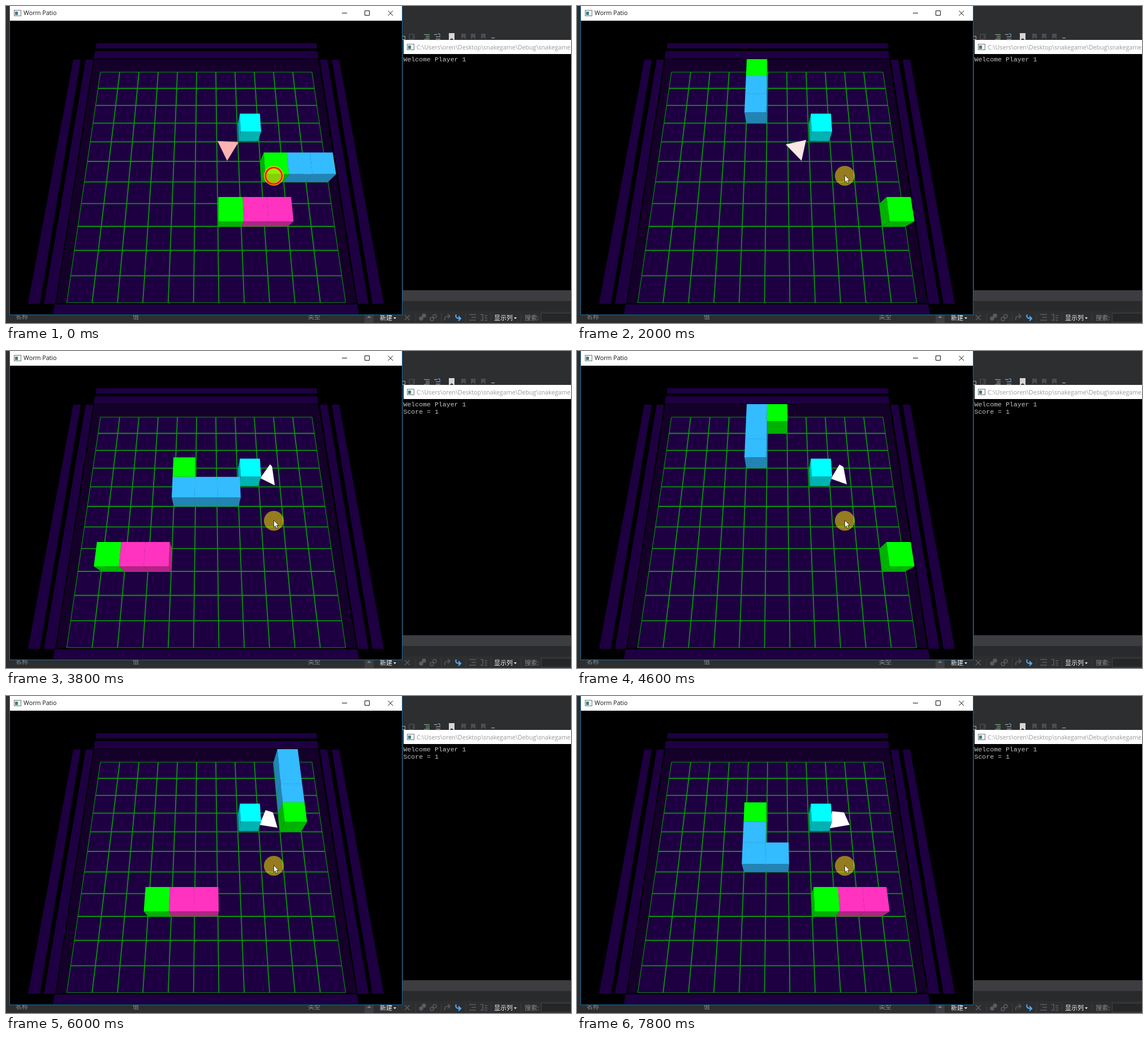
Recreate the animation shown at these times as an HTML page. Size 999x561 px, loop 8000 ms.

```html
<!DOCTYPE html>
<html lang="en">
<head>
<meta charset="utf-8">
<title>Worm Patio</title>
<style>
  html, body { margin: 0; width: 100%; height: 100%; overflow: hidden; background: #2d2e30; }
  svg { display: block; width: 100%; height: 100%; }
  .ui { font: 10.7px "Open Sans", "Noto Sans", sans-serif; }
  .cjk { font: 11px "Noto Sans CJK SC", "Noto Sans CJK", sans-serif; }
  .term { font: 11.55px "Liberation Mono", "Noto Sans Mono", monospace; fill: #c4c4c4; }
</style>
</head>
<body>
<svg viewBox="0 0 999 561" preserveAspectRatio="none">
  <rect width="999" height="561" fill="#2d2e30"/>

  <!-- editor toolbars -->
  <g fill="none" stroke="#55565a">
    <path d="M701 53.5h4.500v6h-4.500" stroke="#aaa"/>
    <path d="M713 50h7v9h-7zM722 49v10"/>
    <path d="M739 50.500h10M742 53.500h7M742 56.500h7M739 59h10" stroke="#8fb98f"/>
    <path d="M757 50.500h6M760 54.500h8M760 58.500h8" stroke="#b8b8b8"/>
    <path d="M764 49q4 0 3 4" stroke="#4a9be0" stroke-width="1.500"/>
    <path d="M783 48h10v13l-5-4-5 4z" fill="#d6d6d6" stroke="none"/>
    <path d="M805 49v10l4-4 4 4v-10zM822 49v10l4-4 4 4v-10zM840 49v10l4-4 4 4v-10z" fill="#4c4d50" stroke="none"/>
    <path d="M858 56.500h6" stroke="#bbb"/>
  </g>
  <rect x="701" y="503" width="298" height="19" fill="#3d3d41"/>
  <rect x="701" y="522" width="298" height="18" fill="#292a2c"/>
  <rect x="634" y="545" width="16" height="16" fill="#3e3e42"/>
  <path d="M638 552l4-4 4 4z" fill="#77787c"/>
  <g class="cjk" fill="#8b8b8d">
    <text x="17" y="554">名称</text>
    <text x="224" y="554">值</text>
    <text x="534" y="554">类型</text>
    <text x="917" y="556">搜索:</text>
    <g fill="#f1f1f1">
      <text x="661" y="556">新建</text>
      <text x="863" y="556">显示列</text>
      <path d="M685 551h5l-2.500 3zM898 551h5l-2.500 3z"/>
    </g>
  </g>
  <g fill="none" stroke="#5b5c60" stroke-width="1.500">
    <path d="M705 547l9 9M714 547l-9 9"/>
    <circle cx="734" cy="553" r="3" fill="#5b5c60"/><circle cx="739" cy="548" r="3" fill="#5b5c60"/>
    <circle cx="753" cy="554" r="3"/><circle cx="758" cy="549" r="3"/>
    <path d="M776 556q-2-8 8-7M781 545l4 4-4 4"/>
    <path d="M796 546q-3 7 7 7M800 549l4 4-4 4" stroke="#55aaf0" stroke-width="2"/>
    <path d="M819 546h12M823 551h8M819 556h12M839 546h4v10h-4M846 548h5M846 552h5M846 556h5"/>
    <path d="M724.500 544v15M769.500 544v15M812.500 544v15M857.500 544v15M910.500 544v15" stroke="#3b3c3f" stroke-width="1"/>
    <rect x="946.500" y="543.500" width="60" height="16" fill="#252628" stroke="#434346" stroke-width="1"/>
  </g>

  <!-- console -->
  <rect x="702" y="60" width="297" height="443" fill="#000"/>
  <rect x="703" y="60" width="296" height="25" fill="#fff"/>
  <g id="badge">
    <rect x="709.500" y="67.500" width="12" height="10" fill="#f4f4f4" stroke="#777"/>
    <rect x="711" y="70" width="5" height="6" fill="#3f7f86"/>
  </g>
  <text class="ui" x="726" y="76.500" fill="#999">C:\Users\oren\Desktop\snakegame\Debug\snakegame.exe</text>
  <text class="term" x="702.500" y="97.500">Welcome Player 1</text>
  <text class="term" x="702.500" y="111" id="score">Score = 1</text>

  <!-- game window -->
  <rect x="6.500" y="-1" width="694" height="547.500" fill="#000" stroke="#1c6ea4"/>
  <rect x="7" width="693" height="26" fill="#fff"/>
  <use href="#badge" x="-695" y="-60"/>
  <text class="ui" x="31" y="16" fill="#111">Worm Patio</text>
  <path d="M594 12.500h9M634.500 8.500h8v8h-8zM675.500 8.500l8.500 8.500M684 8.500l-8.500 8.500" fill="none" stroke="#111"/>

  <g id="board"></g>
  <g id="items"></g>

  <circle cx="473.500" cy="300.500" r="17.500" fill="#ffea00" fill-opacity=".53"/>
  <g id="ring" fill="none">
    <circle cx="473.500" cy="300.500" r="14.500" stroke="#ffb000" stroke-width="4.500"/>
    <circle cx="473.500" cy="300.500" r="14.500" stroke="#f31212" stroke-width="2.600"/>
  </g>
  <path id="arrow" d="M473.500 299.500v12.500l2.800-2.500 2 4.500 2.200-1-2-4.300h3.800z" fill="#fff" stroke="#111" stroke-width=".8"/>
</svg>
<script>
const STEP = 200, LOOP = 8000, EAT = 16;
const FLOOR = '#1e0042', WALL = '#140029';
const $ = id => document.getElementById(id);

const poly = (pts, fill) =>
  `<polygon points="${pts.map(p => p.map(v => v.toFixed(1))).join(' ')}" fill="${fill}"/>`;

// column, row, height -> screen point
function project(c, r, h = 0) {
  const w = 1 - 0.02196 * r - 0.0542 * h;
  return [354 + 34 * (c - 5.5) / w, (117 + 25.56 * r - 28.1 * h) / w];
}

function drawBoard() {
  const bar = (x1, x2, y1, x3, x4, y2) =>
    poly([[x1, y1], [x2, y1], [x4, y2], [x3, y2]], FLOOR);
  const quad = (h, fill) =>
    poly([[0, 0], [11, 0], [11, 11], [0, 11]].map(([c, r]) => project(c, r, h)), fill);
  let s = bar(160, 549, 66, 159, 550, 75) + bar(157, 551, 80, 155, 552, 93)
    + bar(119, 132, 95, 60, 39, 527).replace(/points="[^"]*"/, 'points="119,95 132,95 60,527 39,527"')
    + bar(141, 154, 95, 67, 87, 527) + bar(555, 568, 95, 622, 641, 527)
    + bar(576, 589, 95, 648, 668, 527) + bar(86, 621, 528, 83, 624, 545)
    + quad(1, WALL) + quad(0, FLOOR);
  for (let i = 0; i <= 11; i++) {
    const width = i % 11 ? 1.8 : 1.1;
    for (const [a, b] of [[project(i, 0), project(i, 11)], [project(0, i), project(11, i)]])
      s += `<path d="M${a}L${b}" stroke="#0a940c" stroke-width="${width}"/>`;
  }
  $('board').innerHTML = s;
}

const paint = {
  head: ['#00ff00', '#00b200'],
  blue: ['#33bcff', '#2284b3'],
  pink: ['#ff33bf', '#b22486'],
  cyan: ['#00ffff', '#00b2b2']
};

function cube(col, row, kind, inset = 0, h = 1) {
  const [top, side] = paint[kind];
  const l = col + inset, r = col + 1 - inset, b = row + inset, f = row + 1 - inset;
  const wall = (c1, r1, c2, r2) =>
    poly([project(c1, r1, h), project(c2, r2, h), project(c2, r2), project(c1, r1)], side);
  let s = wall(l, f, r, f);
  if (l > 5.5) s += wall(l, b, l, f);
  if (r < 5.5) s += wall(r, b, r, f);
  s += poly([project(l, b, h), project(r, b, h), project(r, f, h), project(l, f, h)], top);
  return { col, row, svg: s };
}

// player trail, oldest cell first
const dirs = { L: [-1, 0], R: [1, 0], U: [0, -1], D: [0, 1] };
const trail = [[10, 5], [9, 5], [8, 5]];
for (const m of 'LLLLUUUUURRDDDDLLUUUURRRRRDDDDDLLLLLUU') {
  const [x, y] = trail[trail.length - 1];
  trail.push([x + dirs[m][0], y + dirs[m][1]]);
}

function player(n) {
  const end = n + 2, size = n < EAT ? 3 : 4;
  return trail.slice(end - size, end)
    .map(([c, r], i) => cube(c, r, i === size - 1 ? 'head' : 'blue'));
}

// the rival slides left past the edge, then re-enters on the right
function rival(n) {
  const head = 10 - (n + 3) % 13;
  return [0, 1, 2].filter(i => head + i >= 0 && head + i <= 10)
    .map(i => cube(head + i, 7, i ? 'pink' : 'head'));
}

// turning food: outline corners at a few times
const food1 = [
  [0, [374, 239, 411, 241, 391, 274]],
  [800, [372.5, 240.5, 409, 240, 392.5, 274.5]],
  [2000, [369, 245, 405, 237, 397, 274]],
  [3000, [367, 248.5, 400, 236, 400, 273]]
];
const food2 = [
  [4600, [464, 201, 471, 205, 477, 236, 449, 226]],
  [6000, [459, 202, 472, 206, 480, 233, 448, 228]],
  [7800, [451, 204, 472, 206, 482, 228, 447, 234]]
];

function food(n) {
  const t = n * STEP, first = n < EAT, keys = first ? food1 : food2;
  let i = 0;
  while (i < keys.length - 2 && t >= keys[i + 1][0]) i++;
  const [t0, a] = keys[i], [t1, b] = keys[i + 1];
  const u = (t - t0) / (t1 - t0), pts = [];
  for (let j = 0; j < a.length; j += 2)
    pts.push([a[j] + (b[j] - a[j]) * u, a[j + 1] + (b[j + 1] - a[j + 1]) * u]);
  const tint = first ? Math.min(255, Math.round(178 + t * 0.026)) : 255;
  return { col: first ? 6 : 8, row: first ? 4 : 3, svg: poly(pts, `rgb(255,${tint},${tint})`) };
}

function render(time) {
  const tick = Math.floor(time % LOOP / STEP), n = Math.max(1, tick);
  const items = [cube(7, 3, 'cyan', 0.04, 0.95), food(tick), ...player(n), ...rival(n)];
  items.sort((a, b) => a.row - b.row || Math.abs(b.col - 5) - Math.abs(a.col - 5));
  $('items').innerHTML = items.map(o => o.svg).join('');
  $('score').style.display = n < EAT ? 'none' : '';
  $('ring').style.display = tick ? 'none' : '';
  $('arrow').style.display = tick ? '' : 'none';
}

drawBoard();
const start = performance.now();
function loop() {
  render(performance.now() - start);
  requestAnimationFrame(loop);
}
loop();
</script>
</body>
</html>
```
